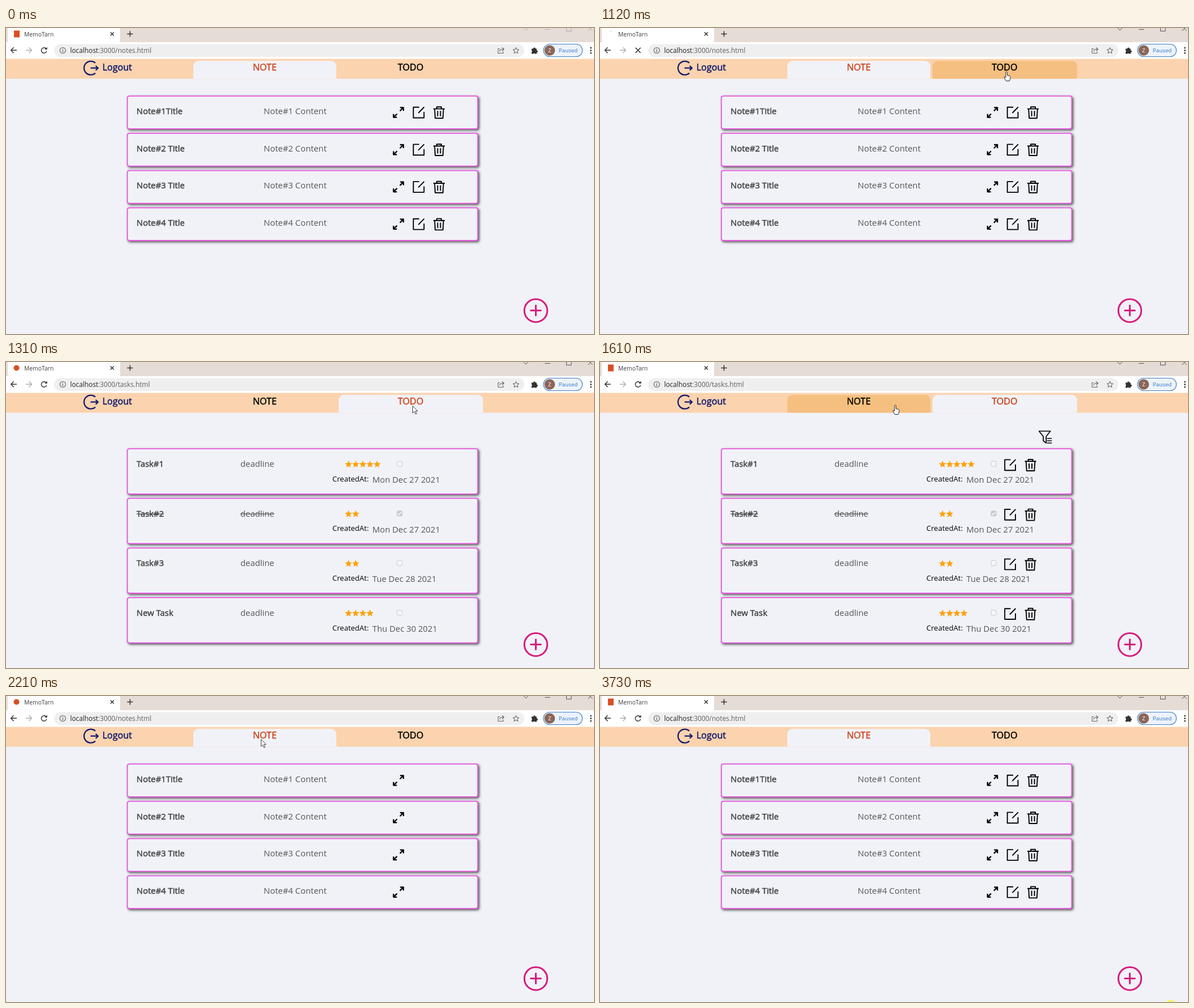
Write an HTML page with a canvas that moves like this. It is 1036x540 px and loops after 3830 ms.

```html
<!DOCTYPE html>
<html lang="en">
<head>
<meta charset="utf-8">
<title>MemoTarn</title>
<style>
html, body { margin: 0; width: 100%; height: 100%; overflow: hidden; background: #f1f2f8; }
canvas { display: block; }
</style>
</head>
<body>
<canvas id="stage" width="1036" height="540"></canvas>
<script>
const g = document.getElementById('stage').getContext('2d');
const LOOP = 3830;
const FONT = '"Open Sans", "Noto Sans", sans-serif';
const PAGE = '#f1f2f8', NAVY = '#131a70', PINK = '#d81b7d', INK = '#555';

// Pointer samples: time, x, y. Each one holds until the next.
const pointer = [
  [100, 964, 508], [200, 903, 447], [300, 836, 387], [400, 664, 206], [500, 638, 162],
  [600, 666, 121], [700, 694, 96], [820, 712, 82], [920, 716, 77], [1410, 706, 78],
  [1510, 606, 79], [1610, 520, 76], [1710, 474, 77], [1810, 448, 77], [2110, 449, 76],
  [2430, 500, 118], [2530, 612, 200], [2630, 688, 270], [2730, 766, 338], [2830, 838, 393],
  [2930, 894, 443], [3030, 930, 480], [3130, 956, 508], [3230, 988, 523]
];
const tabs = [
  { name: 'note', label: 'NOTE', x: 330, w: 252, tx: 435 },
  { name: 'todo', label: 'TODO', x: 586, w: 254.5, tx: 690.3 }
];
const notes = ['Note#1Title', 'Note#2 Title', 'Note#3 Title', 'Note#4 Title'];
const tasks = [
  { title: 'Task#1', stars: 5, date: 'Mon Dec 27 2021' },
  { title: 'Task#2', stars: 2, date: 'Mon Dec 27 2021', done: true },
  { title: 'Task#3', stars: 2, date: 'Tue Dec 28 2021' },
  { title: 'New Task', stars: 4, date: 'Thu Dec 30 2021' }
];

function text(s, x, y, size, color, bold, strike) {
  g.font = size + 'px ' + FONT;
  g.fillStyle = color;
  g.fillText(s, x, y);
  if (bold) {
    g.strokeStyle = color;
    g.lineWidth = 0.5;
    g.lineJoin = 'round';
    g.strokeText(s, x, y);
  }
  const w = g.measureText(s).width;
  if (strike) rect(x, y - 5, w, 1.2, color);
  return w;
}
function rect(x, y, w, h, color) {
  g.fillStyle = color;
  g.fillRect(x, y, w, h);
}
function round(x, y, w, h, r, fill, stroke, width) {
  g.beginPath();
  g.roundRect(x, y, w, h, r);
  if (fill) { g.fillStyle = fill; g.fill(); }
  if (stroke) { g.strokeStyle = stroke; g.lineWidth = width || 1; g.stroke(); }
}
function disc(x, y, r, color) {
  g.beginPath();
  g.arc(x, y, r, 0, 7);
  g.fillStyle = color;
  g.fill();
}
function ring(x, y, r, color, width, a = 0, b = Math.PI * 2) {
  g.beginPath();
  g.arc(x, y, r, a, b);
  g.strokeStyle = color;
  g.lineWidth = width;
  g.stroke();
}
function path(d, x, y, stroke, width, fill) {
  g.save();
  g.translate(x, y);
  const p = new Path2D(d);
  if (fill) { g.fillStyle = fill; g.fill(p); }
  if (stroke) {
    g.strokeStyle = stroke;
    g.lineWidth = width;
    g.lineJoin = 'round';
    g.stroke(p);
  }
  g.restore();
}

function stateAt(t) {
  const s = { page: 'note', load: 'done' };
  if (t >= 1210 && t < 2110) s.page = 'todo';
  const since = t - (t >= 2010 ? 2010 : 1120);
  if (since >= 0 && since < 90) s.load = 'wait';
  else if (since >= 90 && since < 190) s.load = 'blank';
  else if (since >= 190 && since < 290) s.load = 'part';
  s.focused = t >= 1120;
  if (t >= 100 && t < 3330) s.at = pointer.filter(p => p[0] <= t).pop();
  s.over = s.at && s.at[2] >= 58 && s.at[2] < 90 &&
    tabs.find(b => b.name !== s.page && s.at[1] >= b.x && s.at[1] < b.x + b.w);
  return s;
}

function browser(s) {
  const url = ':3000/' + (s.page === 'note' ? 'notes' : 'tasks') + '.html';
  const busy = s.load === 'wait' || s.load === 'blank';
  rect(0, 0, 1036, 25, '#e5dcd6');
  round(3, -10, 198, 40, 8, '#fff');
  rect(0, 25, 1036, 30, '#fff');
  if (busy) ring(18.5, 10.5, 5, '#d4d4d4', 1.2, -1.9, -1.2);
  else if (s.load === 'part') disc(18.5, 10.5, 5, '#d84f24');
  else rect(14, 4.5, 10, 12, '#d84f24');
  text(s.load === 'blank' ? 'localhost' + url : 'MemoTarn', 32, 14.8, 10.3, '#3c3c3c');
  path('M-3-3L3 3M3-3L-3 3', 187, 10.5, '#333', 1.5);
  path('M-5 0H5M0-5V5', 218.5, 10.5, '#333', 1.5);

  const c = s.focused ? '#555' : '#aaa';
  path('M-4 0L0 4L4 0', 916, 0, c, 1);
  path('M0 2.5H9', 949.5, 0, c, 1);
  path('M0-3H8.500V5.500H0Z', 987.5, 0, c, 1);
  path('M-4-3L4 5M4-3L-4 5', 1029.5, 0, c, 1);

  path('M11 0H1M5.500-5L.7 0L5.500 5', 8, 39.3, '#333', 1.5);
  path('M0 0H10M5.500-5L10.300 0L5.500 5', 35, 39.3, '#b0b0b0', 1.4);
  if (busy) path('M-4.500-4.500L4.500 4.500M4.500-4.500L-4.500 4.500', 67, 39.3, '#333', 1.6);
  else {
    ring(67, 39.5, 4.7, '#333', 1.5, 0.3, 5.5);
    path('M5.500-5.500V-1H1Z', 67, 39, null, 0, '#333');
  }
  round(85, 28.5, 828, 22.5, 11, '#efeff0');
  ring(100, 39.5, 5, '#5c5c5c', 1.1);
  rect(99.4, 38.7, 1.3, 3.8, '#5c5c5c');
  rect(99.4, 36.4, 1.3, 1.3, '#5c5c5c');
  const w = text('localhost', 113, 43.7, 11.8, '#222');
  text(url, 113 + w, 43.7, 11.8, '#5f5f5f');

  path('M3-3H0V5H9V2M3 2Q3-2 7-2H10M7-5L10.500-2L7 1', 867, 39.5, '#666', 1.1);
  star(898.5, 40, 5.6, null, '#555');
  path('M-5-3H-2A2 2 0 1 1 2-3H4V0A2 2 0 1 1 4 4V6H1A1.800 1.800 0 0 0-2 6H-5V3A1.700 1.700 0 0 0-5 0Z',
    931, 39.5, null, 0, '#333');
  round(947, 28.5, 68.5, 22, 11, '#edf3fb', '#3d7fc8', 1.1);
  disc(958, 39.5, 9.3, '#8b6558');
  text('Z', 955.3, 43, 9.4, '#fff');
  text('Paused', 973.7, 43.2, 9.8, '#3274c4');
  for (const y of [35, 39.5, 44]) disc(1030.5, y, 1.5, '#444');
}

function header(s) {
  rect(0, 54.5, 1036, 35, '#fbd3ae');
  ring(149.5, 70.7, 12, NAVY, 2.3, 0.85, Math.PI * 2 - 0.85);
  path('M0 0H13M9-4L13.300 0L9 4', 149, 70.7, NAVY, 2.2);
  text('Logout', 170, 75.3, 16, NAVY, true);
  for (const b of tabs) {
    const on = b.name === s.page;
    if (on || b === s.over)
      round(b.x, 58, b.w, 31.5, [9, 9, 0, 0], on ? PAGE : '#f5bf80');
    text(b.label, b.tx, 75.3, 16, on ? '#cf451d' : '#000', true);
  }
}

function card(y, h) {
  g.save();
  g.shadowColor = 'rgba(50,50,50,.85)';
  g.shadowBlur = 4;
  g.shadowOffsetX = g.shadowOffsetY = 2;
  round(213, y, 619, h, 4, '#ea5ce0');
  g.restore();
  round(214.8, y + 1.8, 615.4, h - 3.6, 3, PAGE);
}
function star(x, y, r, fill, stroke) {
  g.beginPath();
  for (let i = 0; i < 10; i++) {
    const a = i * Math.PI / 5 - Math.PI / 2, q = i % 2 ? r * 0.46 : r;
    g.lineTo(x + q * Math.cos(a), y + q * Math.sin(a));
  }
  g.closePath();
  if (fill) { g.fillStyle = fill; g.fill(); }
  if (stroke) { g.strokeStyle = stroke; g.lineWidth = 1; g.stroke(); }
}
function expand(x, y) {
  path('M2.500-2.500L8.500-8.500M2.800-8.700H8.700V-2.800M-2.500 2.500L-8.500 8.500M-2.800 8.700H-8.700V2.800',
    x, y, '#000', 2.3);
}
function actions(x, y) {
  path('M1-9.300H-9.300V9.500H9.500V-1M-.5 1L9.800-9.500', x, y, '#000', 1.9);
  path('M-10-6.700H10M-4-7V-10H4V-7M-7.800-6.500L-6.800 10H6.800L7.800-6.500M-2.500-3V6.500M2.500-3V6.500',
    x + 36, y + 0.3, '#000', 1.9);
}

function notePage(part) {
  notes.forEach((title, i) => {
    const y = 119.3 + i * 65.7;
    card(y, 59.5);
    text(title, 230, y + 32.6, 14.83, '#444', true);
    text(`Note#${i + 1} Content`, 454, y + 32.6, 14.83, INK);
    expand(691.5, y + 29.7);
    if (!part) actions(727, y + 29.7);
  });
}
function taskPage(part) {
  if (!part) path('M0 0H20L12.500 9.500V21L7.500 17V9.500ZM14 13H22.500M14 17H22.500M14 21H22.500',
    773.5, 122, '#000', 1.7);
  tasks.forEach((k, i) => {
    const y = 152.2 + i * 87.6;
    card(y, 81.5);
    text(k.title, 230, y + 32.8, 14.83, '#444', true, k.done);
    text('deadline', 413, y + 32.8, 14.83, INK, false, k.done);
    for (let n = 0; n < k.stars; n++) star(603.5 + n * 12.6, y + 28.5, 6.7, '#fba30f');
    round(689, y + 23, 9, 9, 2, k.done ? '#c9c9cc' : '#f6f6fa', '#c9c9cc', 1);
    if (k.done) path('M-3 0L-1 2.200L3.200-2.500', 693.5, y + 27.5, '#fff', 1.4);
    if (!part) actions(722.5, y + 29.5);
    text('CreatedAt:', 575, y + 58.5, 13.07, '#000');
    text(k.date, 645.5, y + 60.8, 14.75, INK);
  });
}

function cursor(s) {
  if (!s.at) return;
  const [, x, y] = s.at;
  if (s.over) path('M-1 9V1.500A1.300 1.300 0 0 1 1.600 1.500V6.500L5.800 7.500Q7 8 7 9.500V12L5.500 16.500H-.5L-3.500 11.500Q-4-.0 -1 9Z'
    .replace('Q-4-.0 -1 9', 'Q-4.500 9-2.800 9.200L-1 10.500'), x, y, '#222', 1, '#fff');
  else path('M.5.5V13L3.500 10.200L5.600 15L7.600 14.200L5.500 9.500H9.300Z', x, y, '#444', 1, '#fff');
}

function draw(t) {
  const s = stateAt(t);
  rect(0, 0, 1036, 540, PAGE);
  browser(s);
  header(s);
  if (s.load !== 'blank') (s.page === 'note' ? notePage : taskPage)(s.load === 'part');
  ring(933.5, 498.7, 20.2, PINK, 3);
  path('M-10 0H10M0-10V10', 933.5, 498.5, PINK, 3);
  if (t >= 3730) disc(1006, 546, 10, '#f4f46c');
  cursor(s);
}

const start = performance.now();
function tick() {
  draw((performance.now() - start) % LOOP);
  requestAnimationFrame(tick);
}
tick();
</script>
</body>
</html>
```
